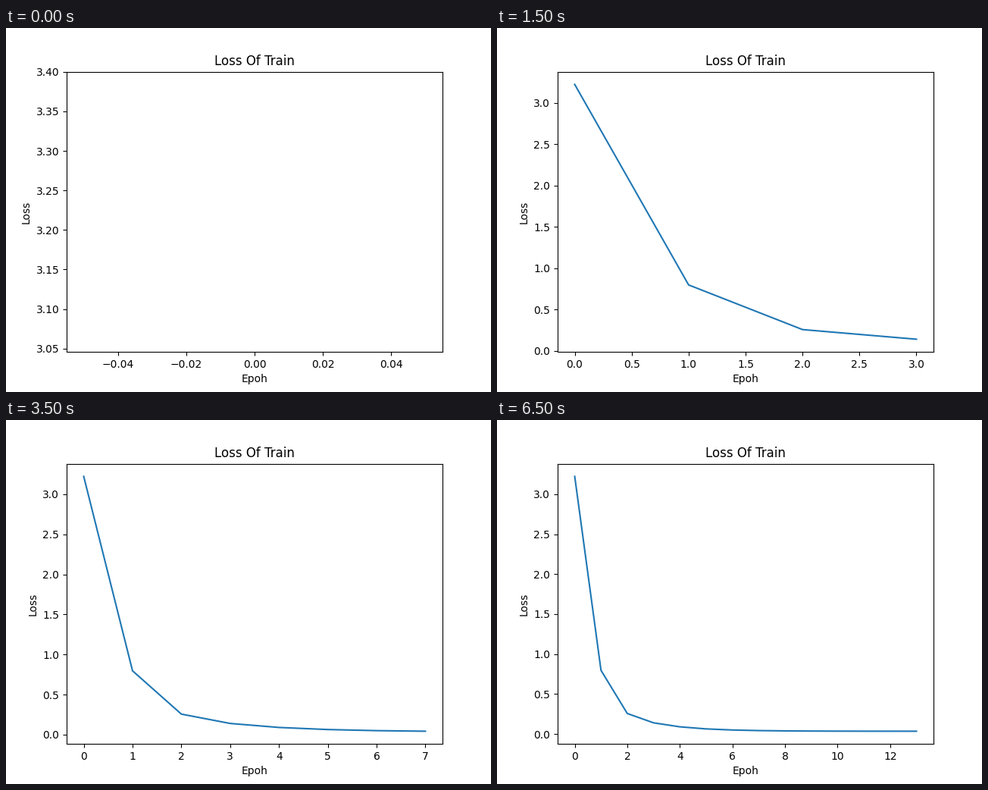
These frames come from a looping animation (640x480 px, 7 s). A matplotlib script:

```python
import numpy as np
import matplotlib.pyplot as plt
from matplotlib.animation import FuncAnimation

EPOCHS = 14
STEP_MS = 500


def loss(k):
    """Steep first drop, then a slow geometric decay to a small floor."""
    drop = 2.4884 * np.exp(-1.85 * k ** 1.31)
    tail = 0.7 * 0.53 ** k
    return 0.0345 + tail + drop


fig, ax = plt.subplots(figsize=(6.4, 4.8), dpi=100)


def draw(i):
    """Plot the losses up to epoch i; the axes rescale to fit them."""
    ax.clear()
    ax.set_title("Loss Of Train")
    ax.set_xlabel("Epoh")
    ax.set_ylabel("Loss")
    epochs = np.arange(i + 1)
    return ax.plot(epochs, loss(epochs), color="#1f77b4")


anim = FuncAnimation(fig, draw, frames=EPOCHS, interval=STEP_MS,
                     init_func=lambda: draw(0), repeat=True, repeat_delay=0)

plt.show()
```
